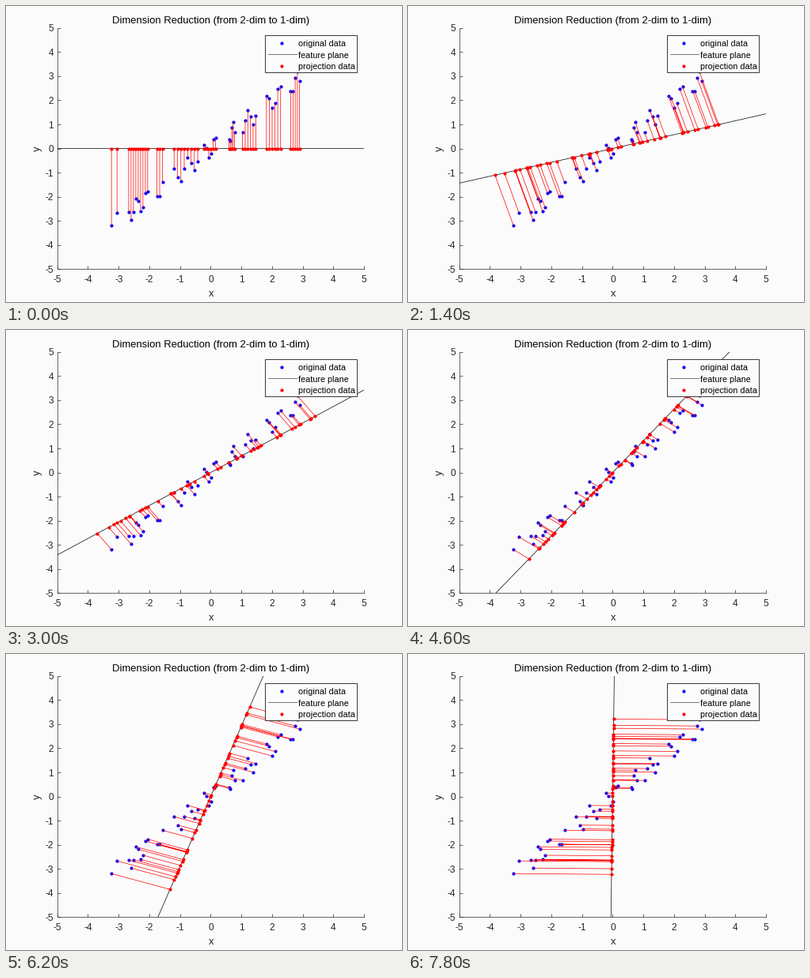
A matplotlib script that plays this animation: 500x375 px, repeating every 8000 ms.

```python
import numpy as np
import matplotlib.pyplot as plt
from matplotlib.animation import FuncAnimation
from matplotlib.lines import Line2D
from matplotlib.patches import Rectangle

W, H, DPI = 500, 375, 100
PT = 72 / DPI
FRAMES, INTERVAL = 40, 200
STEP = 0.04  # radians per frame
BG, INK = "#fbfbfb", "#262626"
LINE, DOT = 0.7 * PT, 4.2 * PT
LEFT, BOTTOM, AX_W, AX_H = 64.6, 41.65, 387.5, 305.6

plt.rcParams["font.family"] = "Liberation Sans"


def sample_points():
    """Clusters along x, with y wavering around the diagonal."""
    clusters = [(-3.23, -3.05, 2), (-2.67, -2.05, 9), (-1.75, -1.57, 3),
                (-1.19, -0.42, 8), (-0.21, 0.16, 6), (0.60, 0.78, 5),
                (1.04, 1.47, 6), (1.82, 2.28, 6), (2.61, 2.90, 5)]
    x = np.concatenate([np.linspace(*c) for c in clusters])
    wave = np.cos(2 * np.pi * (np.arange(len(x)) - 1) / 4.25)
    return np.column_stack([x, x + 0.38 * wave])


POINTS = sample_points()

fig = plt.figure(figsize=(W / DPI, H / DPI), dpi=DPI, facecolor=BG)
ax = fig.add_axes([LEFT / W, BOTTOM / H, AX_W / W, AX_H / H], facecolor=BG)
ax.set(xlim=(-5, 5), ylim=(-5, 5), xticks=range(-5, 6), yticks=range(-5, 6))
ax.tick_params(direction="in", length=3.9 * PT, width=LINE, color=INK,
               labelbottom=False, labelleft=False)
ax.spines[["top", "right"]].set_visible(False)
for side in ("left", "bottom"):
    ax.spines[side].set(linewidth=LINE, color=INK)


def label(x, y, text, size, color=INK, ha="center", va="baseline", **kw):
    """Text with its baseline at pixel (x, y), counted from the top left."""
    fig.text(x / W, 1 - y / H, text, fontsize=size * PT, color=color, ha=ha,
             va=va, zorder=12, **kw)


def stroke(xs, y, color="black", **kw):
    """Horizontal overlay line or dot in pixels from the top left."""
    fig.add_artist(Line2D(np.array(xs) / W, np.full(len(xs), 1 - y / H),
                          color=color, lw=LINE, zorder=11, **kw))


for v in range(-5, 6):
    label(258.5 + AX_W / 10 * v, 350.5, str(v), 11.9)
    label(60, 180.7 - AX_H / 10 * v + 4.4, str(v), 11.9, ha="right")
label(258.7, 21.8, "Dimension Reduction (from 2-dim to 1-dim)", 13, "black")
label(258.7, 367.6, "x", 13.1)
label(40.2, 181, "y", 13.1, rotation=90, va="center")

# Legend
fig.add_artist(Rectangle((326.8 / W, 1 - 83.7 / H), 116 / W, 47 / H, fc=BG, ec=INK,
                         lw=0.9 * PT, zorder=10))
dot = dict(marker="o", ms=DOT, mew=0)
stroke([347.7], 46.8, "blue", **dot)
stroke([330.5, 366.5], 61.2, "#444444")
stroke([347.7], 75.8, "red", **dot)
for row, name in enumerate(("original data", "feature plane", "projection data")):
    label(369, 51 + 14.5 * row, name, 10.7, "black", ha="left")

ax.plot(*POINTS.T, "o", color="blue", ms=DOT, mew=0, zorder=3)
plane, = ax.plot([], [], color="black", lw=LINE, snap=False, zorder=4)
links, = ax.plot([], [], color="red", lw=LINE, snap=False, zorder=5)
feet, = ax.plot([], [], "o", color="red", ms=DOT, mew=0, zorder=6)


def update(i):
    axis = np.array([np.cos(STEP * i), np.sin(STEP * i)])
    proj = np.outer(POINTS @ axis, axis)
    plane.set_data(*np.outer(axis, [-12, 12]))
    gaps = np.full_like(proj, np.nan)
    links.set_data(*np.stack([POINTS, proj, gaps], axis=1).reshape(-1, 2).T)
    feet.set_data(*proj.T)
    return plane, links, feet


anim = FuncAnimation(fig, update, frames=FRAMES, interval=INTERVAL,
                     repeat=True, repeat_delay=0, blit=False)
plt.show()
```
